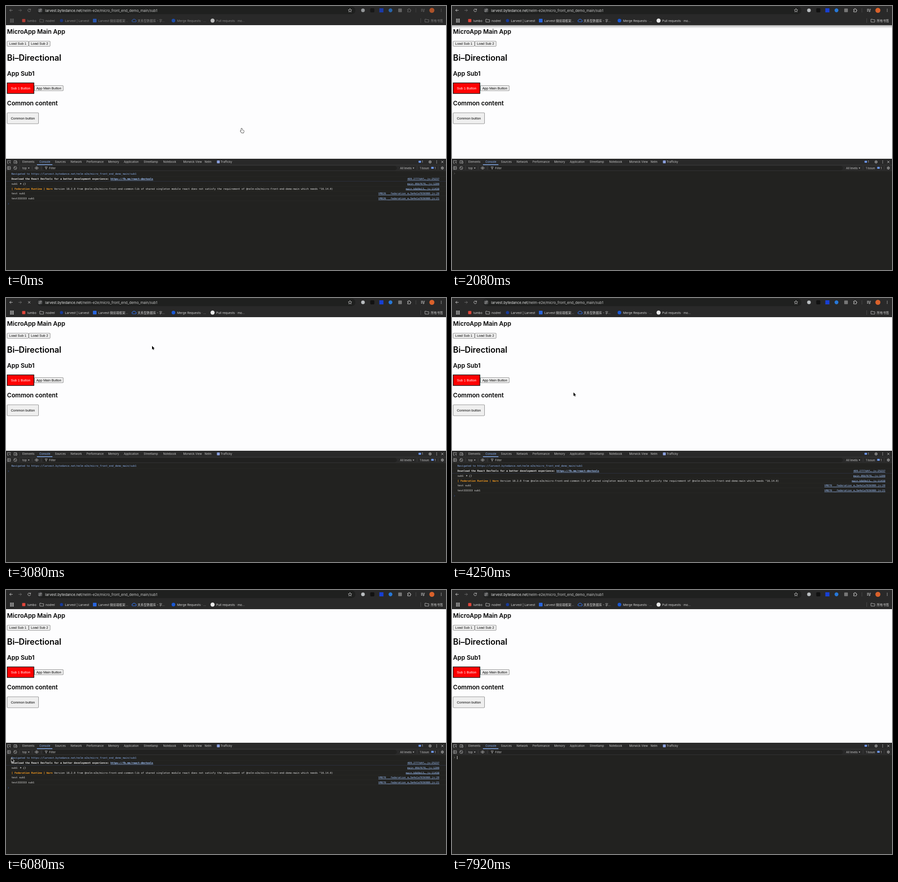
These frames come from a looping animation (967 px wide and 579 px high, 8000 ms). An HTML page with a canvas:

```html
<!DOCTYPE html>
<html lang="en">
<head>
<meta charset="utf-8">
<title>Micro front end demo</title>
<style>
html, body { margin: 0; width: 100%; height: 100%; overflow: hidden; background: #fff; }
canvas { display: block; }
</style>
</head>
<body>
<canvas id="stage" width="967" height="579"></canvas>
<script>
const ctx = document.getElementById('stage').getContext('2d');
const SANS = 'Inter, "Noto Sans CJK SC", "Noto Sans CJK", sans-serif';
const ARIAL = '"Liberation Sans", Arial, sans-serif';
const MONO = '"DejaVu Sans Mono", monospace';
const LOOP = 8000, TICKS_PER_MS = 0.012;
const URL_HOST = 'larvest.bytedance.net';
const URL_PATH = '/nelm-e2e/micro_front_end_demo_main/sub1';

function rect(x, y, w, h, color, r = 0) {
  ctx.fillStyle = color;
  ctx.beginPath();
  ctx.roundRect(x, y, w, h, r);
  ctx.fill();
}

function dot(x, y, r, color) {
  ctx.fillStyle = color;
  ctx.beginPath();
  ctx.arc(x, y, r, 0, 7);
  ctx.fill();
}

// Draws text and returns the x where it ends.
function text(s, x, y, size, color, { font = SANS, weight = 400, align = 'left', style = '' } = {}) {
  ctx.font = `${style} ${weight} ${size}px ${font}`;
  ctx.fillStyle = color;
  ctx.textAlign = align;
  ctx.fillText(s, x, y);
  return x + ctx.measureText(s).width;
}

function icon(d, x, y, color, { fill = false, width = 0.9 } = {}) {
  const path = new Path2D(d);
  ctx.save();
  ctx.translate(x, y);
  ctx.lineWidth = width;
  ctx.fillStyle = ctx.strokeStyle = color;
  fill ? ctx.fill(path) : ctx.stroke(path);
  ctx.restore();
}

const ICONS = {
  back: 'M3.5 0H-3M0-3L-3 0L0 3',
  forward: 'M-3.5 0H3M0-3L3 0L0 3',
  reload: 'M2.6-1.5A3 3 0 1 0 3 .5M3-3.6V-1.2H.6',
  cross: 'M-2.4-2.4L2.4 2.4M2.4-2.4L-2.4 2.4',
  tune: 'M-3.5-1.7H0M2.8-1.7H3.5M-3.5 1.7H-2.8M0 1.7H3.5M.2-1.7a1.3 1.3 0 1 0 2.6 0a1.3 1.3 0 1 0-2.6 0M-2.8 1.7a1.3 1.3 0 1 0 2.6 0a1.3 1.3 0 1 0-2.6 0',
  star: 'M0-4L1.2-1.3L4-1.1L1.9.8L2.5 3.7L0 2.2L-2.5 3.7L-1.9.8L-4-1.1L-1.2-1.3Z',
  puzzle: 'M-3.3-2.4H-1.2V-3.6H.8V-2.4H2.6V-.6H3.8V1.2H2.6V3.5H-3.3V1.4H-2V-.4H-3.3Z',
  list: 'M-4-2.5H1M-4-.3H1M-4 2H-1M2.6 2.4V-2.5H4.5M2.6 2.2a1 1 0 1 0-.1.6',
  folder: 'M-4.2-3H-1L0-1.9H4.2V3.2H-4.2Z',
  cloud: 'M-2.5 2.8a2 2 0 0 1-.4-4a3 3 0 0 1 5.7 0a2 2 0 0 1 0 4Z',
  inspect: 'M-.5 3H-3.2V-3H3.2V-.8M0 0L3.5 1.2L2 2L3.5 3.5',
  devices: 'M-2.8 2V-2.7H3.2M-3.8 2.6H0M1 3V-1H3.6V3Z',
  ban: 'M-3.3 0a3.3 3.3 0 1 0 6.6 0a3.3 3.3 0 1 0-6.6 0M-2.3-2.3L2.3 2.3',
  sidebar: 'M-3.3-3H3.3V3H-3.3ZM-1-3V3M.3 0H2.6',
  eye: 'M-4 0Q0-5 4 0Q0 5-4 0M-1.2 0a1.2 1.2 0 1 0 2.4 0a1.2 1.2 0 1 0-2.4 0',
  funnel: 'M-2.6-2.6H2.6L.6 0V2.4L-.6 2V0Z',
  gear: 'M-2.4 0a2.4 2.4 0 1 0 4.8 0a2.4 2.4 0 1 0-4.8 0M-.9 0a.9.9 0 1 0 1.8 0a.9.9 0 1 0-1.8 0M0-3.7V-2.4M0 3.7V2.4M-3.2-1.8L-2-1.2M3.2 1.8L2 1.2M-3.2 1.8L-2 1.2M3.2-1.8L2-1.2',
  prompt: 'M-1-1.7L.8 0L-1 1.7',
  down: 'M-1.7-1.2H1.7L0 1.5Z',
  arrow: 'M0 0V8L1.9 6.3L3 9L4.4 8.4L3.2 5.8H5.6Z',
  hand: 'M2 5.5V1.2Q3-.2 3.8 1.2V4L7 4.8Q8 5.2 7.8 7L7 10H3L.2 6.6Q.3 5 2 6.2Z'
};

function vdots(x, y, color) {
  for (const d of [-2.4, 0, 2.4]) dot(x, y + d, 0.75, color);
}

function browserBar(n) {
  const active = n >= 5;
  const fg = active ? '#d6d6d6' : '#858585';
  const dim = active ? '#777' : '#626262';
  rect(0, 0, 967, 42, '#292929');
  rect(68, 1, 700, 17, '#1f201f', 8.5);
  icon(ICONS.back, 11, 9.5, fg);
  icon(ICONS.forward, 31, 9.5, dim);
  icon(n >= 35 && n < 38 ? ICONS.cross : ICONS.reload, 51, 9.5, fg);
  dot(75, 9.5, 6, '#343536');
  icon(ICONS.tune, 75, 9.5, '#d0d0d0', { width: 0.8 });
  const end = text(URL_HOST, 86, 12.5, 7.85, '#e4e4e4');
  text(URL_PATH, end, 12.5, 7.85, '#c4c4c4');
  icon(ICONS.star, 756, 9.5, '#d6d6d6', { width: 0.8 });

  ctx.globalAlpha = active ? 1 : 0.75;
  dot(784.5, 9.5, 4, '#b9bdc0');
  rect(800.5, 5, 9, 9, '#111', 2);
  rect(820.5, 5, 9, 9, '#1740d4');
  dot(845, 9.5, 4.2, '#2778d8');
  rect(862, 5.5, 8, 8, '#777', 1);
  icon(ICONS.puzzle, 886, 9.5, fg);
  rect(900.5, 5, 0.8, 9, '#555');
  icon(ICONS.list, 916, 9.5, fg);
  dot(936, 9.5, 5.5, '#d9612b');
  vdots(956.5, 9.5, fg);

  for (let i = 0; i < 9; i++) rect(9 + (i % 3) * 3, 28 + Math.floor(i / 3) * 3, 2, 2, fg);
  rect(35.5, 28.5, 7, 7, '#e2463b', 1);
  icon(ICONS.folder, 78.5, 32, fg, { width: 0.8 });
  dot(122, 32, 3.5, '#173a9a');
  rect(191, 28, 8, 8, '#2864dc', 1);
  icon(ICONS.cloud, 281.5, 32, '#3474ee', { width: 1.1 });
  dot(368, 32, 4, '#1a58d4');
  dot(454, 32, 4.5, '#e9e9e9');
  ctx.globalAlpha = 1;
  const marks = [[47, 'lumbo'], [87, 'nodrel'], [129.5, 'Larvest | Larvest'],
    [203, 'Larvest 微前端框架...'], [289, '关系型数据库 - 字...'],
    [376, 'Merge Requests · ...'], [462, 'Pull requests · mo...'], [933.5, '所有书签']];
  for (const [x, s] of marks) text(s, x, 34.5, 6.75, fg);
  rect(911, 27, 0.8, 10, '#555');
  icon(ICONS.folder, 925, 32, fg, { width: 0.8 });
}

function button(label, x, y, w, h, fill = '#efefef') {
  rect(x, y, w, h, '#717171', 1.7);
  rect(x + 0.8, y + 0.8, w - 1.6, h - 1.6, fill, 1);
  text(label, x + w / 2, y + h / 2 + 2.6, 7.43, '#000', { font: ARIAL, align: 'center' });
}

function page(n) {
  const heading = (s, y, size = 13.4) => text(s, 2.3, y, size, '#000', { weight: 600 });
  rect(0, 42, 967, 293, '#fdfdfe');
  heading('MicroApp Main App', 61);
  button('Load Sub 1', 2.3, 76.8, 47.4, 11.9);
  button('Load Sub 2', 50, 76.8, 47.4, 11.9);
  if (n >= 38 && n < 40) return;
  heading('Bi–Directional', 120, 18);
  heading('App Sub1', 152.6);
  rect(2, 168, 60, 24.5, '#000');
  rect(3.2, 169.2, 57.6, 22, '#f00');
  text('Sub 1 Button', 32.2, 182.7, 7.43, '#fff', { font: ARIAL, align: 'center' });
  button('App Main Button', 62, 174.3, 64.2, 11.9);
  heading('Common content', 218);
  button('Common button', 2.3, 233.7, 69.6, 24.8, n >= 59 && n < 67 ? '#e5e5e5' : '#efefef');
}

function toolShadow(n) {
  if (n < 24 || n > 35) return;
  const strength = Math.min(1, (n - 22) / 4);
  const g = ctx.createLinearGradient(0, 42, 0, 49);
  g.addColorStop(0, `rgba(0,0,0,${0.4 * strength})`);
  g.addColorStop(1, 'rgba(0,0,0,0)');
  rect(0, 42, 967, 7, g);
}

function devtoolsBars() {
  const fg = '#c7c7c7';
  rect(0, 335, 967, 244, '#222220');
  rect(0, 335, 967, 26, '#292929');
  rect(0, 348.6, 967, 0.8, '#3c3c3c');
  rect(0, 361, 967, 0.7, '#343434');
  icon(ICONS.inspect, 6.5, 342, fg, { width: 0.8 });
  icon(ICONS.devices, 20.5, 342, fg, { width: 0.8 });
  rect(29.5, 338, 0.7, 8, '#4a4a4a');
  const tabs = [[36, 'Elements'], [107.5, 'Sources'], [142, 'Network'], [177, 'Performance'],
    [224.5, 'Memory'], [259, 'Application'], [302.5, 'Streetlamp'], [345.5, 'Notebook'],
    [389.5, 'Morwick View'], [436.5, 'Nelm'], [471.5, 'Trafficky']];
  for (const [x, s] of tabs) text(s, x, 344.4, 6.15, fg);
  text('Console', 73.5, 344.4, 6.15, '#8ab4f8');
  rect(68, 347.3, 34, 1.5, '#8ab4f8');
  rect(463.5, 338.8, 6.3, 6.3, '#8a9fdc', 1);

  const badge = (x, y) => {
    rect(x, y - 2.5, 5.5, 4.3, '#6d98ef', 0.7);
    text('1', x + 7.3, y + 2.2, 6.2, fg);
  };
  badge(906.7, 342);
  icon(ICONS.gear, 932, 342, fg, { width: 0.8 });
  vdots(946.5, 342, fg);
  icon(ICONS.cross, 959, 342, fg);

  icon(ICONS.sidebar, 6.5, 355.3, fg, { width: 0.8 });
  icon(ICONS.ban, 20.3, 355.3, fg, { width: 0.8 });
  rect(29.5, 351, 0.7, 8, '#4a4a4a');
  text('top', 36, 357.5, 6.15, fg);
  icon(ICONS.down, 50, 355.6, fg, { fill: true });
  rect(57, 351, 0.7, 8, '#4a4a4a');
  icon(ICONS.eye, 67.3, 355.3, fg, { width: 0.8 });
  rect(77.5, 351, 0.7, 8, '#4a4a4a');
  rect(81, 350.5, 778, 9.8, '#212120', 4.9);
  icon(ICONS.funnel, 88.3, 355.5, fg, { width: 0.8 });
  text('Filter', 94.7, 357.5, 6.15, fg);
  text('All levels', 866, 357.5, 6.15, fg);
  icon(ICONS.down, 895.5, 355.6, fg, { fill: true });
  rect(903, 351, 0.7, 8, '#4a4a4a');
  text('1 Issue:', 909.5, 357.5, 6.15, fg);
  badge(934.5, 355.3);
  rect(949.5, 351, 0.7, 8, '#4a4a4a');
  icon(ICONS.gear, 959, 355.3, fg, { width: 0.8 });
}

function log(n) {
  const count = n < 19 ? 6 : n < 35 ? 0 : n < 38 ? 1 : n < 40 ? 2 : n < 41 ? 4 : n < 79 ? 6 : 0;
  const vm = n < 19 ? 'VM826' : 'VM870';
  const fg = '#e3e3e3', blue = '#9dc0f8';
  const mono = (s, x, y, color = fg, more = {}) => text(s, x, y, 5.57, color, { font: MONO, ...more });
  const link = (s, x, y, more) => {
    const end = mono(s, x, y, blue, more);
    rect(x, y + 0.8, end - x, 0.6, blue);
  };
  const source = (s, y) => {
    ctx.font = `5.57px ${MONO}`;
    link(s, 952.3 - ctx.measureText(s).width, y);
  };
  const bold = { weight: 700 };
  const rows = [
    y => mono('Navigated to https://' + URL_HOST + URL_PATH, 12, y, '#8fb4f2'),
    y => {
      const x = mono('Download the React DevTools for a better development experience: ', 12, y, fg, bold);
      link('https://fb.me/react-devtools', x, y, bold);
      source('409.2777d4f….js:25237', y);
    },
    y => {
      mono('sub1', 12, y);
      icon('M-1.3-1.8L1.5 0L-1.3 1.8Z', 32.7, y - 2, '#c8c8c8', { fill: true });
      mono('{}', 37.3, y, fg, { style: 'italic' });
      source('main.09b7670….js:1209', y);
    },
    y => {
      const x = mono('[ Federation Runtime ] Warn ', 12, y, '#f39a1f', bold);
      mono('Version 18.2.0 from @nelm-e2e/micro-front-end-common-lib of shared singleton module react does not satisfy the requirement of @nelm-e2e/micro-front-end-demo-main which needs ^16.14.0)', x, y);
      source('main.b8d0e13….js:11438', y);
    },
    y => { mono('test sub1', 12, y); source(vm + ' __federation_e…5e4e1a7656980.js:20', y); },
    y => { mono('test333333 sub1', 12, y); source(vm + ' __federation_e…5e4e1a7656980.js:21', y); }
  ];
  rows.slice(0, count).forEach((draw, i) => {
    const y = 370.3 + i * 10.75;
    rect(0, y + 3.2, 967, 0.6, i === 1 ? '#35405f' : '#2c2c2b');
    draw(y);
  });
  const promptY = count ? 369.2 + count * 10.75 : 367.3;
  icon(ICONS.prompt, 5.5, promptY, n >= 81 ? '#8a8a8a' : count ? '#34579c' : '#707070', { width: 0.8 });
  if (n >= 81 && n < 89 || n >= 95) rect(11, 364, 0.9, 7, '#e8e8e8');
}

// Pointer tip: [tick, x, y]
const MOVES = [[4, 515, 268], [10, 282, 219], [13, 282, 219], [14, 280, 217], [18, 21, 352],
  [19, 20, 351], [23, 60, 3], [24, 60, -20], [34, 310, -20], [37, 321, 105], [45, 321, 105],
  [48, 324, 192], [50, 324, 192], [51, 267, 207], [56, 120, 256], [60, 54, 244], [63, 20, 242],
  [65, 20, 242], [69, 95, 290], [73, 12, 369], [75, 15, 382], [78, 20, 350], [79, 20, 350],
  [81, 28, 386]];

function pointer(n) {
  if (n >= 89) return;
  const next = MOVES.findIndex(m => m[0] >= n);
  const b = MOVES[next < 0 ? MOVES.length - 1 : next];
  const a = next > 0 ? MOVES[next - 1] : b;
  const k = a === b ? 0 : (n - a[0]) / (b[0] - a[0]);
  const x = a[1] + (b[1] - a[1]) * k, y = a[2] + (b[2] - a[2]) * k;
  const hand = n < 5;
  const shape = hand ? ICONS.hand : ICONS.arrow;
  icon(shape, x, y, hand ? '#222' : '#fff', { width: 1.4 });
  icon(shape, x, y, hand ? '#fff' : '#000', { fill: true });
}

function draw(now) {
  const n = Math.floor((now % LOOP + 4) * TICKS_PER_MS) % 96;
  page(n);
  toolShadow(n);
  browserBar(n);
  devtoolsBars();
  log(n);
  pointer(n);
}

const start = performance.now();
(function frame() {
  draw(performance.now() - start);
  requestAnimationFrame(frame);
})();
</script>
</body>
</html>
```
